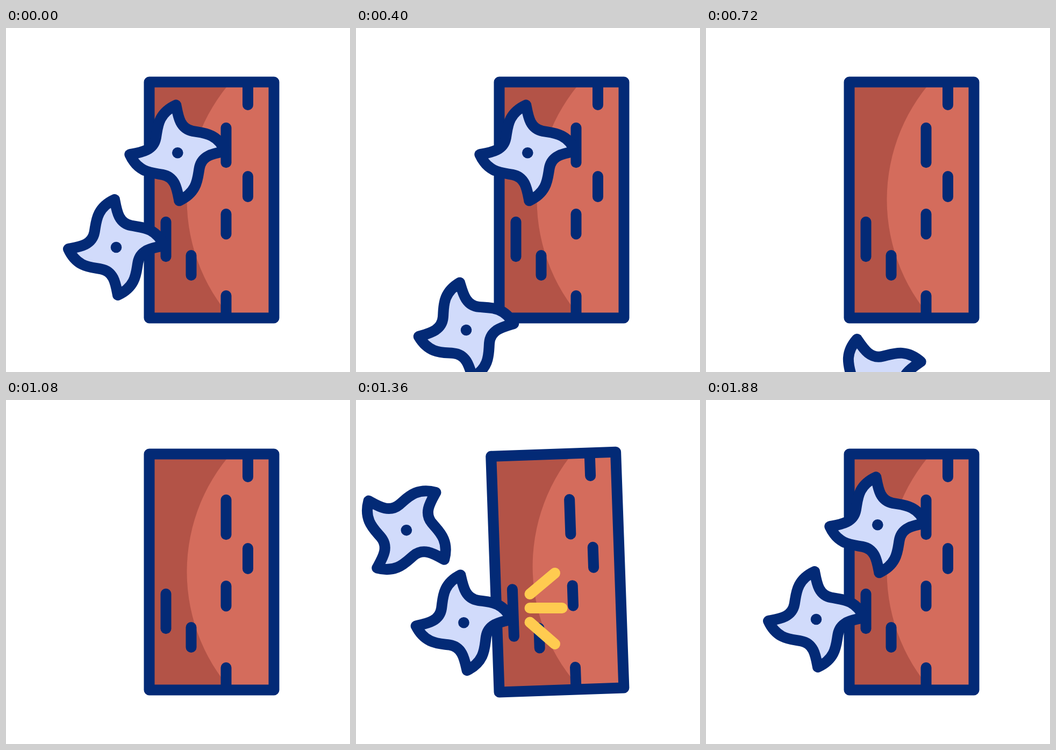
Animation, 640 px wide and 640 px high, one loop 2000 ms. Source, as an HTML page:

```html
<!DOCTYPE html>
<html lang="en">
<head>
<meta charset="utf-8">
<title>Throwing stars</title>
<style>
  html, body { margin: 0; width: 100%; height: 100%; overflow: hidden; background: #fff; }
  svg { display: block; width: 100vw; height: 100vh; }
  .ink { stroke: #032a76; }
  .dot { fill: #032a76; }
  .ray { stroke: #ffcb50; }
</style>
</head>
<body>
<svg viewBox="0 0 640 640" fill="none" stroke-width="20" stroke-linecap="round" stroke-linejoin="round">
  <defs>
    <clipPath id="inside"><rect x="266.5" y="100.5" width="232" height="439"/></clipPath>
  </defs>
  <g id="scene">
    <g clip-path="url(#inside)">
      <rect x="266" y="100" width="233" height="440" fill="#b35347"/>
      <circle cx="671.5" cy="319.5" r="335" fill="#d46c5c"/>
    </g>
    <rect class="ink" x="266.5" y="100.5" width="232" height="439"/>
    <path class="ink" d="M450 102V143M450 276V314M409.5 346V383.5M344.5 423V460M409.5 498V538"/>
  </g>
  <g id="rays"></g>
</svg>
<script>
const LOOP = 2000, STEP = 40, LAG = 240;
const scene = document.getElementById('scene');
const rayLayer = document.getElementById('rays');

const clamp = x => Math.min(1, Math.max(0, x));
const span = (t, a, b) => clamp((t - a) / (b - a));
const smooth = p => p * p * (3 - 2 * p);
const mix = (a, b, p) => a + (b - a) * p;

function add(parent, tag, attrs) {
  const el = document.createElementNS('http://www.w3.org/2000/svg', tag);
  setAll(el, attrs);
  parent.appendChild(el);
  return el;
}
function setAll(el, attrs) {
  for (const k in attrs) el.setAttribute(k, attrs[k]);
}

// One side of the star, turned four times by quarter turns.
function starPath() {
  const side = [[1, -68], [4, -45], [28, -40.5], [46, -37], [73, -38], [89, -3]];
  let d = 'M-3 -89';
  for (let q = 0; q < 4; q++) {
    const pts = side.map(([x, y]) => {
      for (let i = 0; i < q; i++) [x, y] = [-y, x];
      return x + ' ' + y;
    });
    d += 'C' + pts.join(' ');
  }
  return d + 'Z';
}

const hits = [
  { x: 205, y: 408, drop: 616, slot: [297.5, 393], ray: [323.5, 387] },
  { x: 319.3, y: 232.3, drop: 667, slot: [409.5, 218], ray: [428, 216] }
];
// Offsets from the ray origin: start x, start y, end x, end y, delay
const rayShapes = [[0, 0, 60, 0, 0], [0, -26, 46.5, -65, 40], [0, 26.5, 46.5, 67, 40]];

const outline = starPath();
hits.forEach((h, i) => {
  h.fallAt = 200 + 200 * i;
  h.late = LAG * i;
  h.bar = add(scene, 'line', { class: 'ink', x1: h.slot[0], x2: h.slot[0] });
  h.star = add(scene, 'g', {});
  add(h.star, 'path', { class: 'ink', d: outline, fill: '#d1dbfb' });
  add(h.star, 'circle', { class: 'dot', r: 10.3 });
  h.rays = rayShapes.map(() => add(rayLayer, 'line', { class: 'ray' }));
});

function drawStar(h, t) {
  const u = t - h.late;
  let x = h.x, y = h.y, turn = 0;
  if (u < 1040) {
    const p = span(t, h.fallAt, h.fallAt + 400);
    y += h.drop * p * p;
    turn = -46 * p ** 3;
  } else {
    const left = 1 - span(u, 1040, 1200) ** 1.45;
    x -= 339 * left;
    turn = -360 * left;
  }
  h.star.setAttribute('transform', `translate(${x} ${y}) rotate(${turn})`);
}

function drawBar(h, t) {
  const u = t - h.late;
  const pulse = smooth(1 - clamp(Math.abs(u - 1360) / 160));
  const half = 32.3 + 11.5 * pulse;
  setAll(h.bar, { y1: h.slot[1] - half, y2: h.slot[1] + half });
}

function drawRays(h, t) {
  const u = t - h.late;
  const [ox, oy] = h.ray;
  rayShapes.forEach(([x1, y1, x2, y2, delay], i) => {
    const head = smooth(span(u, 1160 + delay, 1280));
    const tail = smooth(span(u, 1400 + delay, 1520 + delay));
    setAll(h.rays[i], {
      x1: ox + mix(x1, x2, tail), y1: oy + mix(y1, y2, tail),
      x2: ox + mix(x1, x2, head), y2: oy + mix(y1, y2, head),
      visibility: head > tail ? 'visible' : 'hidden'
    });
  });
}

// Shake after the first hit: one key every 80 ms.
function tilt(t) {
  const keys = [0, 2, -2, 2, -2, 0];
  const k = span(t, 1200, 1600) * 5;
  const i = Math.min(4, Math.floor(k));
  return mix(keys[i], keys[i + 1], k - i);
}

function draw(t) {
  scene.setAttribute('transform', `rotate(${tilt(t)} 382.5 540)`);
  for (const h of hits) {
    drawStar(h, t);
    drawBar(h, t);
    drawRays(h, t);
  }
}

const start = performance.now();
function tick() {
  const t = (performance.now() - start) % LOOP;
  draw(Math.floor(t / STEP) * STEP);
  requestAnimationFrame(tick);
}
tick();
</script>
</body>
</html>
```
